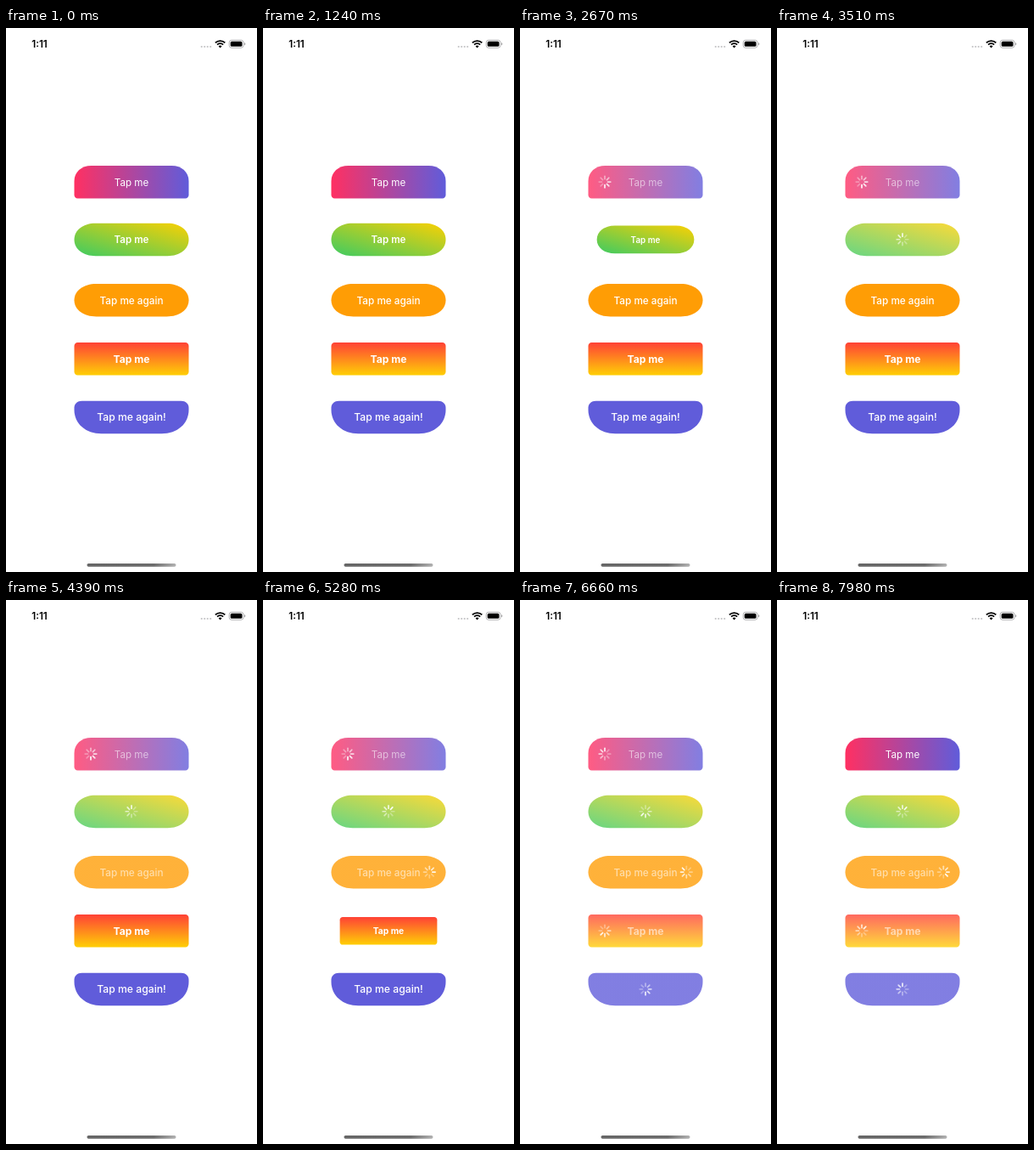
Write an HTML page with a canvas that moves like this. It is 296 by 640 pixels and loops after 8000 ms.

```html
<!DOCTYPE html>
<html lang="en">
<head>
<meta charset="utf-8">
<title>Loading buttons</title>
<style>
  html, body { margin: 0; width: 100%; height: 100%; overflow: hidden; background: #fff; }
  canvas { display: block; width: 296px; height: 640px; }
</style>
</head>
<body>
<canvas id="stage"></canvas>
<script>
const W = 296, H = 640, LOOP = 8000;
const FONT = 'Inter, "Liberation Sans", sans-serif';
const BTN_W = 135, BTN_H = 38.5, BTN_X = 80.5;
const PRESS_SCALE = 0.85, SPIN_PERIOD = 880, LOAD_TIME = 5750;

const canvas = document.getElementById('stage');
const ctx = canvas.getContext('2d');
const dpr = Math.max(1, window.devicePixelRatio || 1);
canvas.width = W * dpr;
canvas.height = H * dpr;

// Gradient ends are in unit coordinates; top/bot are corner radii [rx, ry].
// release: finger lifts; phase: spinner turn at the end of the loop.
const buttons = [
  { y: 162, text: 'Tap me', size: 11.6, weight: 400, colors: ['#ff3062', '#605cda'], line: [0, 0.5, 1, 0.5],
    top: [20, 18], bot: [4, 4], spinX: 100, release: 1600, phase: 0.58 },
  { y: 229.7, text: 'Tap me', size: 11.6, weight: 600, colors: ['#3ecb62', '#fbd003'], line: [0, 1, 1, 0],
    top: [25, 19.2], bot: [25, 19.2], spinX: 148, hideText: true, release: 2750, phase: 0.2 },
  { y: 301, text: 'Tap me again', size: 11.75, weight: 500, colors: ['#ff9d05', '#ff9d05'], line: [0, 0, 0, 1],
    top: [26, 19.2], bot: [26, 19.2], spinX: 196.3, release: 4050, phase: 0.4 },
  { y: 370, text: 'Tap me', size: 12.1, weight: 700, colors: ['#ff4136', '#ffcf05'], line: [0, 0, 0, 1],
    top: [4, 4], bot: [4, 4], spinX: 100, release: 5330, phase: 0.2 },
  { y: 438.8, text: 'Tap me again!', size: 12.2, weight: 500, colors: ['#605cda', '#605cda'], line: [0, 0, 0, 1],
    top: [9, 8], bot: [32, 28], spinX: 148, hideText: true, release: 6100, phase: 0.1 }
];

const clamp = v => Math.min(1, Math.max(0, v));
const ease = v => v * v * (3 - 2 * v);
const ramp = (t, start, dur) => ease(clamp((t - start) / dur));
const mix = (a, b, k) => a + (b - a) * k;

function circle(x, y, r) {
  ctx.beginPath();
  ctx.arc(x, y, r, 0, Math.PI * 2);
  ctx.fill();
}

function pill(x, y, w, h, r) {
  ctx.beginPath();
  ctx.roundRect(x, y, w, h, r);
}

function label(text, x, y, size, weight) {
  ctx.font = `${weight} ${size}px ${FONT}`;
  ctx.textAlign = 'center';
  ctx.textBaseline = 'alphabetic';
  ctx.fillText(text, x, y);
}

function buttonPath(w, h, [tx, ty], [bx, by]) {
  const k = 0.42;
  ctx.beginPath();
  ctx.moveTo(tx, 0);
  ctx.lineTo(w - tx, 0);
  ctx.bezierCurveTo(w - tx * k, 0, w, ty * k, w, ty);
  ctx.lineTo(w, h - by);
  ctx.bezierCurveTo(w, h - by * k, w - bx * k, h, w - bx, h);
  ctx.lineTo(bx, h);
  ctx.bezierCurveTo(bx * k, h, 0, h - by * k, 0, h - by);
  ctx.lineTo(0, ty);
  ctx.bezierCurveTo(0, ty * k, tx * k, 0, tx, 0);
  ctx.closePath();
}

function spinner(x, y, turn, alpha) {
  if (alpha <= 0) return;
  ctx.save();
  ctx.translate(x, y);
  ctx.strokeStyle = '#fff';
  ctx.lineWidth = 1.7;
  ctx.lineCap = 'round';
  for (let i = 0; i < 8; i++) {
    const lag = (((turn - i / 8) % 1) + 1) % 1;
    ctx.globalAlpha = alpha * mix(0.95, 0.32, Math.min(1, lag * 1.35));
    ctx.beginPath();
    ctx.moveTo(0, -3.5);
    ctx.lineTo(0, -6.8);
    ctx.stroke();
    ctx.rotate(Math.PI / 4);
  }
  ctx.restore();
}

function drawButton(b, t) {
  const end = b.release + LOAD_TIME;
  const press = ramp(t, b.release - 270, 150) * (1 - ramp(t, b.release, 180));
  const dim = ramp(t, b.release, 300) * (1 - ramp(t, end + 120, 250));
  const spin = ramp(t, b.release + 350, 150) * (1 - ramp(t, end, 150));
  const scale = mix(1, PRESS_SCALE, press);
  const midY = b.y + BTN_H / 2;

  ctx.save();
  ctx.translate(BTN_X + BTN_W / 2, midY);
  ctx.scale(scale, scale);

  ctx.save();
  ctx.translate(-BTN_W / 2, -BTN_H / 2);
  buttonPath(BTN_W, BTN_H, b.top, b.bot);
  ctx.scale(BTN_W, BTN_H);
  const g = ctx.createLinearGradient(...b.line);
  b.colors.forEach((c, i) => g.addColorStop(i, c));
  ctx.fillStyle = g;
  ctx.globalAlpha = mix(1, 0.79, dim);
  ctx.fill();
  ctx.restore();

  ctx.fillStyle = '#fff';
  ctx.globalAlpha = mix(1, 0.57, dim) * (b.hideText ? 1 - spin : 1);
  label(b.text, 0, 4.4, b.size, b.weight);
  ctx.restore();

  spinner(b.spinX, midY - 0.2, b.phase + (t - 7980) / SPIN_PERIOD, spin);
}

function drawStatusBar() {
  ctx.fillStyle = '#000';
  label('1:11', 39.5, 23, 11.8, 600);

  ctx.fillStyle = '#c4c4c6';
  for (let i = 0; i < 4; i++) circle(230.7 + i * 3.5, 22, 1.1);

  // Wi-Fi fan
  const a = Math.PI / 4;
  ctx.strokeStyle = ctx.fillStyle = '#000';
  ctx.lineWidth = 1.8;
  for (const r of [8.1, 5]) {
    ctx.beginPath();
    ctx.arc(252.6, 23.2, r, -a * 3, -a);
    ctx.stroke();
  }
  ctx.beginPath();
  ctx.moveTo(252.6, 23.4);
  ctx.arc(252.6, 23.4, 2.8, -a * 3, -a);
  ctx.fill();

  // Battery
  ctx.strokeStyle = '#a9a9ab';
  ctx.lineWidth = 0.9;
  pill(263.2, 14.3, 16.8, 9, 2.8);
  ctx.stroke();
  pill(264.7, 15.8, 13.8, 6, 1.6);
  ctx.fill();
  ctx.fillStyle = '#a9a9ab';
  pill(281, 17.3, 1.2, 3, [0, 1, 1, 0]);
  ctx.fill();
}

function drawHomeBar() {
  const g = ctx.createLinearGradient(95.5, 0, 200.5, 0);
  g.addColorStop(0, '#666');
  g.addColorStop(0.75, '#6c6c6c');
  g.addColorStop(1, '#b2b2b2');
  ctx.fillStyle = g;
  pill(95.5, 630, 105, 3.7, 1.85);
  ctx.fill();
}

function draw(t) {
  ctx.setTransform(dpr, 0, 0, dpr, 0, 0);
  ctx.fillStyle = '#fff';
  ctx.fillRect(0, 0, W, H);
  drawStatusBar();
  buttons.forEach(b => drawButton(b, t));
  drawHomeBar();
}

const start = performance.now();
function tick() {
  draw((performance.now() - start) % LOOP);
  requestAnimationFrame(tick);
}
tick();
</script>
</body>
</html>
```
